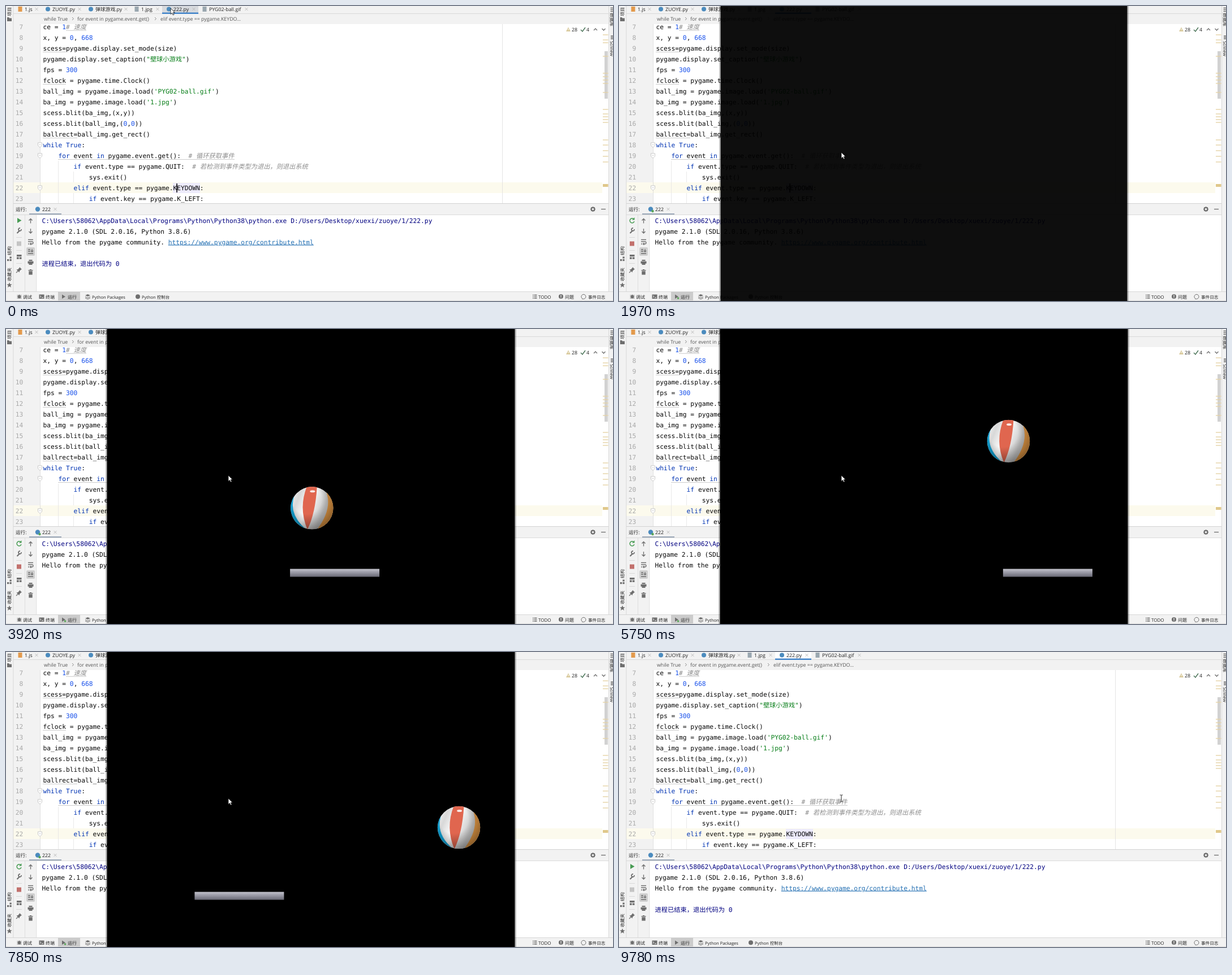
An HTML page that plays this animation: 1073x522 px, repeating every 9980 ms.

```html
<!DOCTYPE html>
<html lang="zh-CN">
<head>
<meta charset="utf-8">
<style>
html, body { margin: 0; width: 100%; height: 100%; overflow: hidden; background: #f2f2f2; }
svg { display: block; }
text { white-space: pre; text-rendering: geometricPrecision; font-family: "Open Sans", "Noto Sans CJK SC", sans-serif; fill: #222; }
.mono { font: 11.24px "DejaVu Sans Mono", "Noto Sans CJK SC", monospace; fill: #080808; }
.num { fill: #a9a9a9; }
.mono .keyword { fill: #0033b3; }
.mono .number { fill: #1750eb; }
.mono .string { fill: #067d17; }
.mono .comment { fill: #8c8c8c; font-style: italic; }
.navy { fill: #000080; }
.link { fill: #2470b3; text-decoration: underline; }
.line { fill: none; stroke: #6e6e6e; stroke-width: 1.3; }
</style>
</head>
<body>
<svg id="stage" width="1073" height="522" viewBox="0 0 1073 522">
  <defs>
    <linearGradient id="metal" x2="0" y2="1">
      <stop stop-color="#c3c3cc"/><stop offset=".35" stop-color="#a2a2ae"/><stop offset="1" stop-color="#686874"/>
    </linearGradient>
    <radialGradient id="shade" cx=".38" cy=".3" r=".75">
      <stop offset=".45" stop-opacity="0"/><stop offset="1" stop-opacity=".42"/>
    </radialGradient>
    <linearGradient id="silver" x2="1" y2=".4">
      <stop stop-color="#fff"/><stop offset=".25" stop-color="#d8d8d8"/><stop offset=".5" stop-color="#fff"/><stop offset=".85" stop-color="#c4c4c4"/>
    </linearGradient>
    <clipPath id="disc"><circle r="37.7"/></clipPath>
    <clipPath id="editorClip"><rect x="13" y="32" width="1052" height="317"/></clipPath>
  </defs>
  <g id="ide"></g>
  <g id="game">
    <rect x="177.5" y="-80" width="723" height="700" fill="none" stroke="#000" stroke-opacity=".25" stroke-width="3"/>
    <rect x="178.5" y="-80" width="721" height="700"/>
    <g id="sprites">
      <rect id="paddle" y="424.5" width="158" height="14" fill="url(#metal)"/>
      <g id="ball" clip-path="url(#disc)">
        <circle r="38" fill="url(#silver)"/>
        <path d="M-28-30Q-46 8-10 38L-40 40V-30Z" fill="#12a3d6"/>
        <path d="M-9-38Q-24 0-8 38Q6 10 9-38Z" fill="#e0664f"/>
        <path d="M24-32Q38 0 9 38L40 40V-32Z" fill="#e59a45"/>
        <circle r="38" fill="url(#shade)"/>
        <ellipse cx="1" cy="-29.500" rx="4.500" ry="2" fill="#fff" opacity=".85"/>
      </g>
    </g>
  </g>
  <path id="arrow" d="M0 0V10.500L2.500 8.300 4.200 12 6 11.200 4.400 7.600H7.500Z" fill="#fff" stroke="#111" stroke-width=".8"/>
  <path id="beam" d="M-2.500-6H-.5L0-5.500.5-6H2.500M0-5.500V5.500M-2.500 6H-.5L0 5.500.5 6H2.500" fill="none" stroke="#222"/>
</svg>
<script>
const LOOP = 9980;
const $ = id => document.getElementById(id);

const rect = (x, y, w, h, fill, extra = '') => `<rect x="${x}" y="${y}" width="${w}" height="${h}" fill="${fill}" ${extra}/>`;
const dot = (x, y, r, fill) => `<circle cx="${x}" cy="${y}" r="${r}" fill="${fill}"/>`;
const path = (d, extra = '') => `<path class="line" d="${d}" ${extra}/>`;
const shape = (d, fill = '#6e6e6e') => `<path d="${d}" fill="${fill}"/>`;
const label = (x, y, text, size = 8.8, extra = '') => `<text x="${x}" y="${y}" font-size="${size}" ${extra}>${text}</text>`;
const mono = (x, y, text, cls = '') => `<text class="mono" x="${x}" y="${y}"><tspan class="${cls}">${text}</tspan></text>`;
const turned = (x, y, angle, text, size = 8) => label(0, 0, text, size, `transform="translate(${x} ${y}) rotate(${angle})"`);
const cross = (x, y) => path(`M${x - 2.5} ${y - 2.5}l5 5m0-5l-5 5`, 'style="stroke:#b5b5b5;stroke-width:.9"');
const group = (id, body) => `<g id="${id}">${body}</g>`;

const CODE = [
  'ce = 1# 速度',
  'x, y = 0, 668',
  'scess=pygame.display.set_mode(size)',
  'pygame.display.set_caption("壁球小游戏")',
  'fps = 300',
  'fclock = pygame.time.Clock()',
  "ball_img = pygame.image.load('PYG02-ball.gif')",
  "ba_img = pygame.image.load('1.jpg')",
  'scess.blit(ba_img,(x,y))',
  'scess.blit(ball_img,(0,0))',
  'ballrect=ball_img.get_rect()',
  'while True:',
  '    for event in pygame.event.get():  # 循环获取事件',
  '        if event.type == pygame.QUIT:  # 若检测到事件类型为退出，则退出系统',
  '            sys.exit()',
  '        elif event.type == pygame.KEYDOWN:',
  '            if event.key == pygame.K_LEFT:'
];
const TOKENS = /(?<comment>#.*)|(?<string>'[^']*'|"[^"]*")|\b(?<keyword>while|True|for|in|if|elif)\b|\b(?<number>\d+)\b/g;
const highlight = source => source.replace(TOKENS, (token, ...rest) => {
  const kinds = rest[rest.length - 1];
  return `<tspan class="${Object.keys(kinds).find(k => kinds[k])}">${token}</tspan>`;
});
const lineY = n => 36.5 + 19.03 * (n - 7);

function tabs() {
  const list = [['1.js', 25, 54, '#e39a4c'], ['ZUOYE.py', 74, 130], ['弹球游戏.py', 150, 212],
    ['1.jpg', 231, 268, '#9aa7b0'], ['222.py', 288, 332], ['PYG02-ball.gif', 351, 425, '#9aa7b0']];
  return rect(276, 0, 64, 13, '#fff') + `<rect id="hover" x="276" y="0" width="64" height="13" fill="#d7dade"/>` +
    rect(13, 13, 1052, .8, '#d4d4d4') + rect(276, 11.5, 64, 2.5, '#4083c9') +
    list.map(([name, icon, close, color]) =>
      (color ? rect(icon - 3.5, 1, 7, 9, color) : dot(icon, 5.5, 4, '#4b8bbe')) +
      label(icon + 8, 9, name) + cross(close, 5.5)).join('');
}

function breadcrumbs() {
  const style = 'style="fill:#555"';
  return label(67, 26, 'while True', 8.8, style) + label(126, 26, 'for event in pygame.event.get()', 8.8, style) +
    label(273, 26, 'elif event.type == pygame.KEYDO...', 8.8, style) +
    path('M117 20l2.500 2.500-2.500 2.500M263 20l2.500 2.500-2.500 2.500', 'style="stroke-width:.8"');
}

function editor() {
  const marks = [51, 60, 65, 89, 119, 125, 131, 137, 153, 183, 191, 196, 201, 206, 237, 246, 256, 266, 276];
  const hints = [[106, 142, 7], [65, 106, 9], [65, 106, 12], [65, 126, 17], [92, 404, 19]];
  return `<g clip-path="url(#editorClip)">` + rect(60, 32, 1005, 317, '#fff') +
    rect(13, 312, 1041, 19, '#fcfaed') + rect(60, 32, .8, 317, '#d9d9d9') + rect(877, 32, .8, 317, '#dedede') +
    rect(295, 313, 48, 18, '#edebfc') +
    rect(92, 274, .8, 75, '#e4e4e4') + rect(119, 293, .8, 19, '#e4e4e4') + rect(119, 331, .8, 18, '#e4e4e4') +
    hints.map(([a, b, n]) => rect(a, lineY(n) + 6.3, b - a, .9, '#c4c4c4')).join('') +
    CODE.map((source, i) => mono(i < 3 ? 23.5 : 16.8, lineY(i + 7) + 4, i + 7, 'num') +
      mono(65.5, lineY(i + 7) + 4, highlight(source))).join('') +
    [18, 19, 22].map(n => `<path d="M56.500 ${lineY(n) - 4}h7v5l-3.500 3.500-3.500-3.500zm2 3.500h3" fill="#fff" stroke="#c5c5c5" stroke-width=".9"/>`).join('') +
    `<rect id="caret" x="301.300" y="314" width="1.500" height="16" fill="#000"/>` +
    rect(1058, 80, 6, 84, '#d2d2d2') +
    marks.map(y => rect(1055, y - .7, 9.5, 1.4, '#e5d3a5')).join('') + rect(1055, 315, 9.5, 5, '#e0c88b') +
    shape('M994 37.500l4 7.500h-8z', '#d8c99b') + rect(993.6, 40, .9, 3, '#fff') +
    label(1000, 45, '28') + path('M1016 42l3 3 5-7', 'style="stroke:#3f6b4d"') + label(1026, 45, '4') +
    path('M1039 43l3-3 3 3M1053.500 40l3 3 3-3') + '</g>';
}

function consolePanel() {
  const path38 = 'C:\\Users\\58062\\AppData\\Local\\Programs\\Python\\Python38\\python.exe D:/Users/Desktop/xuexi/zuoye/1/222.py';
  return rect(13, 349, 1052, .9, '#cfcfcf') + label(17, 363, '运行:', 8.6) +
    dot(56, 359.5, 4.2, '#4b8bbe') + group('liveDot', dot(59.5, 363, 2.2, '#5aa65a')) +
    label(64, 363, '222') + cross(87, 359.5) + rect(41, 367, 57, 2.3, '#9ca9b9') +
    dot(1037.5, 359.5, 3, 'none" stroke="#6e6e6e" stroke-width="2') +
    path('M1037.500 355v9M1033 359.500h9M1034.300 356.300l6.400 6.400M1034.300 362.700l6.400-6.400', 'style="stroke-width:1"') +
    dot(1037.5, 359.5, 1.7, '#f2f2f2') + path('M1052 359.500h8') +
    rect(54, 369.5, 1011, 135.5, '#fff') + rect(13, 369, 1052, .8, '#d4d4d4') +
    rect(33, 370, .8, 135, '#d9d9d9') + rect(53.5, 370, .8, 135, '#d9d9d9') +
    mono(63.5, 383.5, path38, 'navy') +
    group('greeting', mono(63.5, 402.5, 'pygame 2.1.0 (SDL 2.0.16, Python 3.8.6)') +
      mono(63.5, 421.5, 'Hello from the pygame community. <tspan class="link">https://www.pygame.org/contribute.html</tspan>')) +
    group('exitNote', mono(63.5, 459.5, '进程已结束，退出代码为 0', 'navy'));
}

function toolbar() {
  return group('idle', shape('M20 375l7.500 4.500-7.500 4.500z', '#499c54') + rect(19, 416.5, 8, 8, '#c4c4c4')) +
    group('running', path('M26 377a4 4 0 1 0 1 4', 'style="stroke:#499c54;stroke-width:1.500"') +
      shape('M27.500 374v4.500h-4.500z', '#499c54') + rect(19, 416.5, 8, 8, '#c2706c')) +
    path('M19.500 402l4.500-4.500', 'style="stroke-width:2.200"') + path('M27 395a2.500 2.500 0 1 1-2-2', 'style="stroke-width:1.800"') +
    rect(18, 409, 10, .8, '#d4d4d4') + rect(18, 432, 10, .8, '#d4d4d4') + rect(18, 455, 10, .8, '#d4d4d4') +
    rect(19, 440, 8.5, 3.3, '#6e6e6e') + rect(19, 444.5, 3.7, 3.3, '#6e6e6e') + rect(23.8, 444.5, 3.7, 3.3, '#6e6e6e') +
    shape('M24 462l4 4-1.500.5-2.500 2.500-.5 2.500-5-5 2.500-.5 2.500-2.500z') + path('M21 469l-3 3') +
    group('arrows', path('M43.500 384.500v-8m-3 3l3-3 3 3M43.500 394v8m-3-3l3 3 3-3')) +
    path('M39 413.500h9M39 417h7a2 2 0 0 1 0 4h-3m1.500-1.700l-2 1.700 2 1.700M39 421h2') +
    rect(36, 427, 15, 15, '#cfcfcf', 'rx="2"') + path('M39 431h4M39 434h4M39 438h9M46 430v5m-2-2l2 2 2-2') +
    rect(40.5, 449, 6, 2, '#6e6e6e') + rect(38.5, 451.7, 10, 4, '#6e6e6e') + rect(40.5, 455, 6, 3, '#6e6e6e') +
    rect(39.5, 467, 8, 1.4, '#6e6e6e') + rect(42, 466, 3, 1.4, '#6e6e6e') + rect(40.3, 469.2, 6.4, 6.3, '#6e6e6e');
}

function frameStrips() {
  return rect(12.5, 0, .8, 505, '#d1d1d1') + rect(1065, 0, .8, 505, '#d1d1d1') +
    turned(9, 18, -90, '项目') + shape('M2 20h3l1 1.500h4v5.500h-8z') +
    turned(9, 441, -90, '结构') + rect(2, 448, 3.2, 3.2, '#6e6e6e') + rect(6.5, 448, 3.2, 3.2, '#6e6e6e') + rect(6.5, 443.5, 3.2, 3.2, '#6e6e6e') +
    turned(9, 487, -90, '收藏夹') + shape('M6 489l1.300 3.200 3.400.2-2.600 2.200.9 3.400-3-1.900-3 1.900.9-3.400-2.600-2.200 3.400-.2z') +
    turned(1067.5, 12, 90, '数据库') + path('M1068.500 3.500h5M1068.500 6.500h5M1068.500 9.500h5') +
    turned(1068, 62, 90, 'SciView', 7.8) + path('M1069 53h4M1069 55.500h4M1069 58h4') +
    rect(0, 505, 1073, .8, '#d1d1d1') + rect(92, 506, 39, 16, '#cbcbcb') + rect(0, 521, 1073, 1, '#dcdcdc');
}

function statusBar() {
  const items = [[30, '调试'], [70, '终端'], [109, '运行'], [152, 'Python Packages', 7.5], [240, 'Python 控制台', 7.5],
    [941, 'TODO', 8], [988, '问题'], [1029, '事件日志', 7.6]];
  return items.map(([x, text, size = 8]) => label(x, 517.5, text, size)).join('') +
    dot(23.5, 514.5, 2.8, '#6e6e6e') + path('M19.500 512h8M19.500 514.500h8M19.500 517h8M23.500 510.500v2', 'style="stroke-width:.9"') +
    rect(58.5, 510.5, 9, 7.5, '#6e6e6e') + path('M60 512.500l2 1.700-2 1.700M63 516h3', 'style="stroke:#fff;stroke-width:.9"') +
    shape('M99 510.500l6 3.800-6 3.800z') + group('statusDot', dot(104.5, 517, 1.8, '#5aa65a')) +
    shape('M144.500 510l4.500 2-4.500 2-4.500-2zM140 514l4.500 2 4.500-2v1l-4.500 2-4.500-2zM140 516.300l4.500 2 4.500-2v1l-4.500 2-4.500-2z') +
    dot(233, 514.3, 4, '#6e6e6e') +
    path('M931 511.500h1.500m1 0h5M931 514.300h1.500m1 0h5M931 517h1.500m1 0h5') +
    dot(981, 514, 4, '#6e6e6e') + rect(980.4, 511.3, 1.2, 3.5, '#fff') + rect(980.4, 515.6, 1.2, 1.2, '#fff') +
    path('M1018.500 517.500a4 4 0 1 1 3 .8h-3z', 'style="stroke-width:1"');
}

$('ide').innerHTML = rect(0, 0, 1073, 522, '#f2f2f2') + tabs() + breadcrumbs() + editor() +
  consolePanel() + toolbar() + frameStrips() + statusBar();

// Keys are [time, x, y]; positions are linear between them.
const POINTER = [[0, 291, 4], [50, 291, 4], [330, 410, 320], [590, 456, 276], [690, 456, 276], [830, 295, 259],
  [1010, 295, 259], [1450, 393, 259]];
const BALL = [[1963, 181, -43], [4320, 569, 345], [5010, 609, 235], [5460, 651, 161], [7170, 651, 161],
  [8200, 820.5, 330.5], [9400, 623, 528]];
const RUN = 1600, OPEN = 1880, CLOSE = 9250, EXIT = 9550, IDLE = 9780;

const clamp = v => Math.min(1, Math.max(0, v));
function along(keys, t) {
  const i = keys.findIndex(k => k[0] > t);
  if (i === 0) return keys[0].slice(1);
  if (i < 0) return keys[keys.length - 1].slice(1);
  const [t0, x0, y0] = keys[i - 1], [t1, x1, y1] = keys[i], p = (t - t0) / (t1 - t0);
  return [x0 + (x1 - x0) * p, y0 + (y1 - y0) * p];
}
function bounce(distance, range) {
  const d = distance % (2 * range);
  return d > range ? 2 * range - d : d;
}
const show = (id, on) => { $(id).style.display = on ? '' : 'none'; };
const place = (id, [x, y]) => $(id).setAttribute('transform', `translate(${x} ${y})`);

function render(t) {
  const running = t >= RUN && t < IDLE;
  show('running', running);
  show('idle', !running);
  show('liveDot', t >= RUN && t < EXIT);
  show('statusDot', t >= RUN && t < EXIT);
  show('greeting', t < RUN || t >= 1830);
  show('exitNote', t < RUN || t >= EXIT);
  $('arrows').style.opacity = t >= RUN && t < 1830 ? .35 : 1;
  show('caret', t < 500 || (t >= 1010 && t < IDLE));

  const pointer = along(POINTER, t);
  const isBeam = (t < 1010 && pointer[1] > 32) || t >= 9450;
  show('hover', pointer[1] < 13);
  show('arrow', !isBeam);
  show('beam', isBeam);
  place('arrow', pointer);
  place('beam', pointer);

  const fadeIn = 1 - (1 - clamp((t - OPEN) / 120)) ** 2;
  const alpha = fadeIn * (1 - clamp((t - CLOSE) / 160));
  const scale = 1 - .05 * (1 - alpha);
  show('game', alpha > 0);
  $('game').style.opacity = alpha;
  $('game').setAttribute('transform', `translate(539 261) scale(${scale}) translate(-539 -261)`);
  show('sprites', t >= 2030);
  $('paddle').setAttribute('x', 180 + bounce(Math.max(0, .1645 * (t - 1963)), 561));
  const [left, top] = along(BALL, t);
  place('ball', [left + 37.5, top + 37.5]);
}

const start = performance.now();
function tick() {
  render((performance.now() - start) % LOOP);
  requestAnimationFrame(tick);
}
tick();
</script>
</body>
</html>
```
